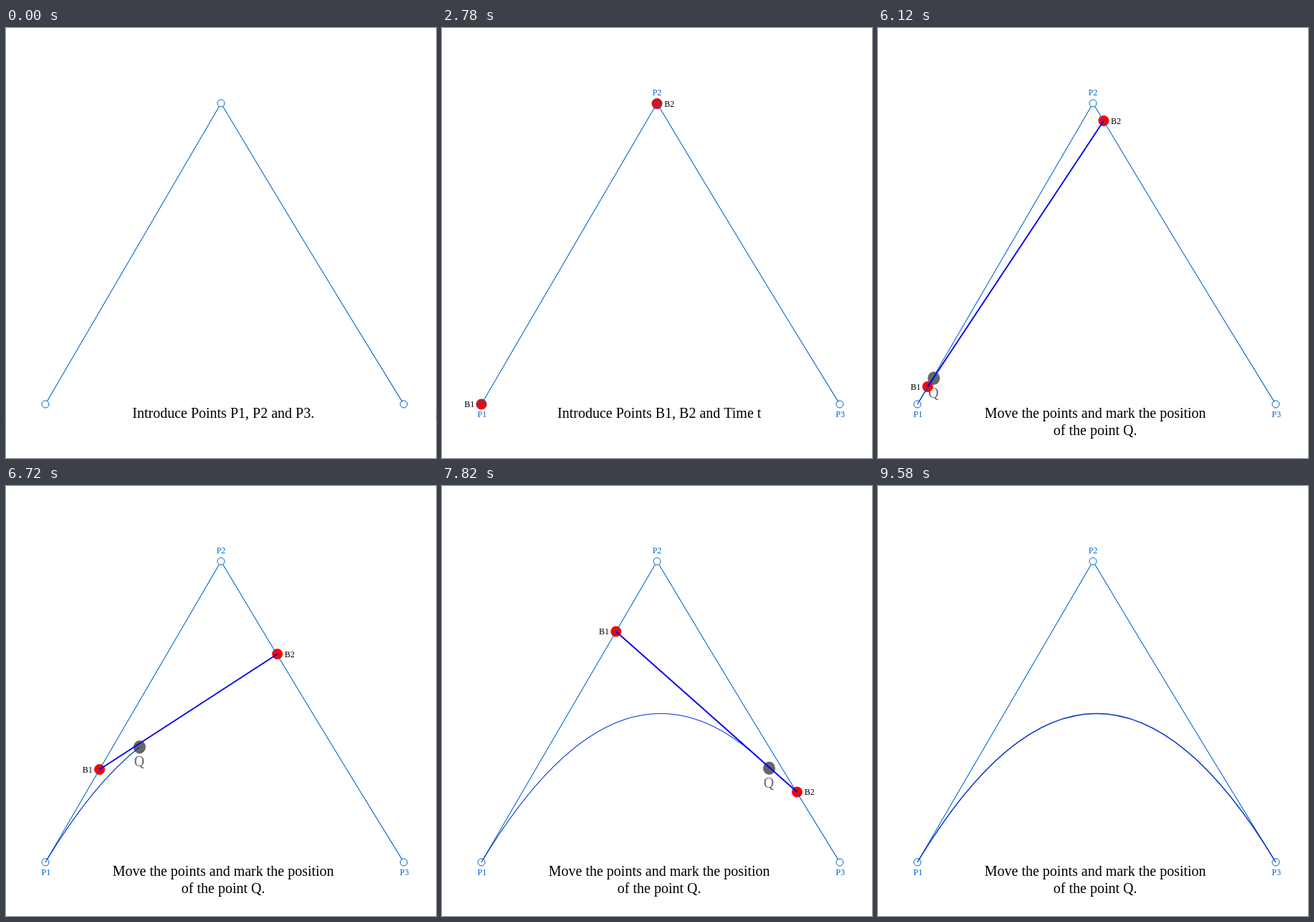
Write an HTML page with a canvas that moves like this. It is 600 by 600 pixels and loops after 9.6 s.

```html
<!DOCTYPE html>
<html lang="en">
<head>
<meta charset="utf-8">
<title>Constructing a quadratic curve</title>
<style>
html, body { margin: 0; width: 100%; height: 100%; overflow: hidden; background: #fff; }
canvas { display: block; }
</style>
</head>
<body>
<canvas id="stage" width="600" height="600"></canvas>
<script>
const ctx = document.getElementById('stage').getContext('2d');
const LOOP = 9600, STEP = 20;
const BLUE = '#0066cc', DEEP = '#0000ee', CURVE = '#0033cc', GREY = '#666666';
const P1 = [55, 525], P2 = [300, 105], P3 = [555, 525];
const CTRL = [305, 110];

const CAPTIONS = [
  [5960, 'Move the points and mark the position', 'of the point Q.'],
  [3180, 'Draw a line between B1 and B2 and', 'introduce the point Q'],
  [1580, 'Introduce Points B1, B2 and Time t'],
  [0, 'Introduce Points P1, P2 and P3.']
];

const lerp = (a, b, k) => a + (b - a) * k;
const mix = (a, b, k) => [lerp(a[0], b[0], k), lerp(a[1], b[1], k)];
const ramp = (t, from, to) => Math.min(1, Math.max(0, (t - from) / (to - from)));
const bezier = u => mix(mix(P1, CTRL, u), mix(CTRL, P3, u), u);

// Cumulative lengths let Q travel along the curve at constant speed.
const PARTS = 400;
const lengths = [0];
for (let i = 1; i <= PARTS; i++) {
  const a = bezier((i - 1) / PARTS), b = bezier(i / PARTS);
  lengths.push(lengths[i - 1] + Math.hypot(b[0] - a[0], b[1] - a[1]));
}

function paramAt(fraction) {
  const goal = fraction * lengths[PARTS];
  let i = 1;
  while (i < PARTS && lengths[i] < goal) i++;
  return (i - 1 + (goal - lengths[i - 1]) / (lengths[i] - lengths[i - 1])) / PARTS;
}

function stroke(color, width) {
  ctx.strokeStyle = color;
  ctx.lineWidth = width;
  ctx.stroke();
}

function line(a, b, color, width) {
  ctx.beginPath();
  ctx.moveTo(...a);
  ctx.lineTo(...b);
  stroke(color, width);
}

function disc([x, y], rx, ry, color) {
  ctx.beginPath();
  ctx.ellipse(x, y, rx, ry, 0, 0, Math.PI * 2);
  ctx.fillStyle = color;
  ctx.fill();
}

function text(str, x, y, size, color, align = 'center') {
  ctx.font = size + 'px "Liberation Serif", "Times New Roman", serif';
  ctx.textAlign = align;
  ctx.fillStyle = color;
  ctx.fillText(str, x, y);
}

function drawFrame() {
  // P1 to P2 and P2 to P3, stopping at the rims of the rings.
  line(mix(P1, P2, 0.01), mix(P2, P1, 0.01), BLUE, 1.1);
  const from = mix(P2, P3, 0.01), to = mix(P3, P2, 0.008);
  ctx.beginPath();
  ctx.moveTo(...from);
  ctx.quadraticCurveTo(426, 316, ...to);
  stroke(BLUE, 1.1);
  for (const p of [P1, P2, P3]) {
    ctx.beginPath();
    ctx.arc(...p, 5, 0, Math.PI * 2);
    stroke(BLUE, 1);
  }
}

function drawNames(t) {
  const k = ramp(t, 80, 1180);
  text('P1', lerp(-5, 55.8, k), 543, 12, BLUE);
  text('P2', 300, lerp(0, 94, k), 12, BLUE);
  text('P3', lerp(605, 555.8, k), 543, 12, BLUE);
}

function drawQ(t) {
  let q;
  if (t < 5960) q = mix([-32, 335], P1, ramp(t, 4360, 5580));
  else if (t < 8415) q = bezier(paramAt(ramp(t, 5965, 8415)));
  else q = mix(P3, [675, 531], ramp(t, 8415, 9380));
  disc(q, 8.5, 9.3, GREY);
  text('Q', q[0] - 0.5, q[1] + 27, 20, GREY);
}

function drawB(b1, b2) {
  disc(b1, 7.5, 7.5, '#ff0000');
  disc(b2, 7.5, 7.5, '#ff0000');
  text('B1', b1[0] - 9.8, b1[1] + 4, 12, '#000', 'right');
  text('B2', b2[0] + 10.2, b2[1] + 4, 12, '#000', 'left');
}

function placeB(t) {
  if (t < 5960) {
    const k = ramp(t, 1560, 2780);
    return [mix([-41, 525], P1, k), mix([618, 102], [300, 105.6], k)];
  }
  const out = ramp(t, 8380, 9380);
  if (out > 0) return [mix(P2, [304, -12], out), mix(P3, [675, 527], out)];
  const k = ramp(t, 5980, 8380);
  return [mix(P1, P2, k), mix(P2, P3, k)];
}

function drawCurve(t) {
  const u = paramAt(ramp(t, 5965, 8415));
  ctx.beginPath();
  ctx.moveTo(...P1);
  ctx.quadraticCurveTo(...mix(P1, CTRL, u), ...bezier(u));
  stroke(CURVE, t < 8415 ? 1.1 : 1.4);
}

function drawLink(t, b1, b2) {
  if (t < 3180 || t >= 9580) return;
  if (t < 5960) line(mix(P1, P2, 0.01), mix(P1, P2, Math.min(0.99, ramp(t, 3160, 4325))), BLUE, 2.2);
  else if (t < 8380) line(b1, b2, DEEP, 1.9);
  else line(mix(P2, P3, 0.012), mix(P3, P2, 0.012), DEEP, 1.9);
}

function render(t) {
  ctx.fillStyle = '#fff';
  ctx.fillRect(0, 0, 600, 600);
  const [b1, b2] = placeB(t);
  if (t >= 4360) drawQ(t);
  if (t >= 1560) drawB(b1, b2);
  drawFrame();
  if (t >= 5960) drawCurve(t);
  drawLink(t, b1, b2);
  drawNames(t);
  const [, ...rows] = CAPTIONS.find(c => t >= c[0]);
  rows.forEach((row, i) => text(row, 303.2, 544 + 24 * i, 20, '#000'));
}

const start = performance.now();
function tick() {
  const t = (performance.now() - start) % LOOP;
  render(Math.floor(t / STEP) * STEP);
  requestAnimationFrame(tick);
}
tick();
</script>
</body>
</html>
```
